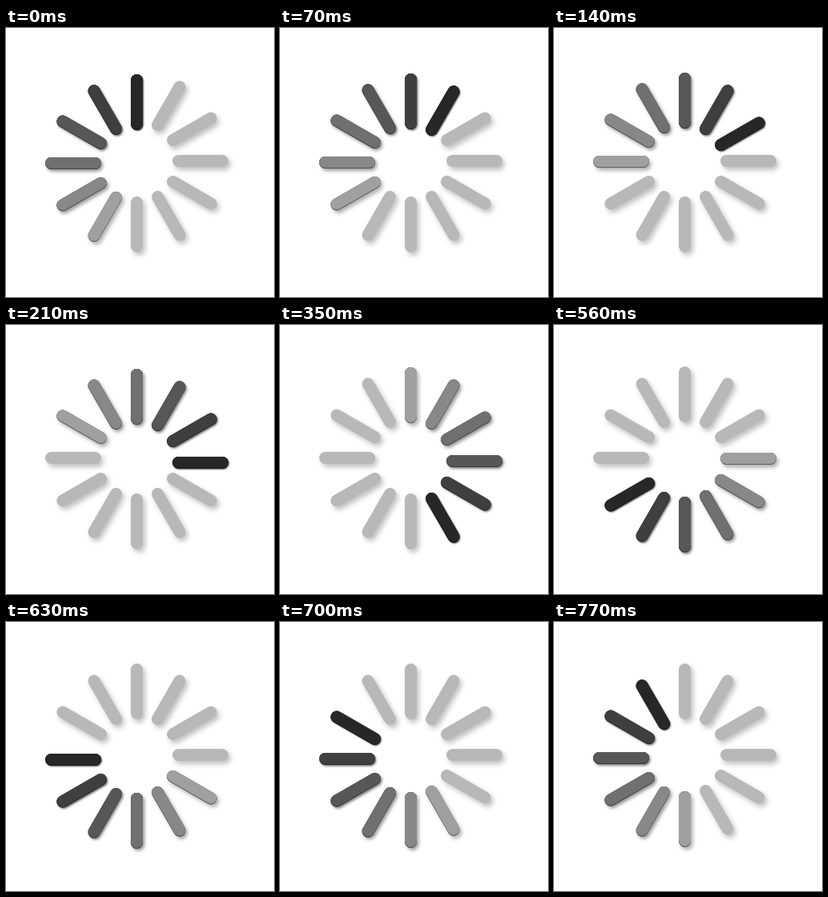
An HTML page with a canvas that plays this animation: 335 px wide and 337 px high, repeating every 840 ms.

```html
<!DOCTYPE html>
<html lang="en">
<head>
<meta charset="utf-8">
<title>Spinner</title>
<style>
  html, body { margin: 0; width: 100%; height: 100%; overflow: hidden; background: #fff; }
  canvas { display: block; }
</style>
</head>
<body>
<canvas id="stage" width="335" height="337"></canvas>
<script>
const ctx = document.getElementById('stage').getContext('2d');
const BARS = 12, STEP_MS = 70, REST = 6;
const CENTER = { x: 163.5, y: 166.5 };
const INNER = 52, OUTER = 107, THICKNESS = 15;

const mix = (a, b, t) => a + (b - a) * t;
const gray = v => `rgb(${v}, ${v}, ${v})`;

function strokeBar(angle, drop, color) {
  const dx = Math.sin(angle), dy = -Math.cos(angle);
  const y = CENTER.y + drop;
  ctx.strokeStyle = color;
  ctx.beginPath();
  ctx.moveTo(CENTER.x + dx * INNER, y + dy * INNER);
  ctx.lineTo(CENTER.x + dx * OUTER, y + dy * OUTER);
  ctx.stroke();
}

// A pressed bar sits lower, darker and closer to its shadow, then rises back.
function drawBar(index, age) {
  const angle = index * 2 * Math.PI / BARS;
  const rise = Math.min(age, REST) / REST;
  const drop = REST * (1 - rise);
  const shade = Math.round(mix(39, 184, rise));
  const edge = rise < 1 ? Math.round(mix(28, 108, rise)) : shade;

  ctx.save();
  ctx.shadowColor = `rgba(0, 0, 0, ${mix(0.65, 0.25, rise)})`;
  ctx.shadowOffsetX = mix(1, 3, rise);
  ctx.shadowOffsetY = mix(1, 4, rise);
  ctx.shadowBlur = mix(2, 6, rise);
  strokeBar(angle, drop, gray(edge));
  ctx.restore();

  if (rise < 1) {
    // Lighter face above a thin dark lower rim.
    ctx.save();
    ctx.globalCompositeOperation = 'source-atop';
    strokeBar(angle, drop, gray(edge));
    ctx.clip(barOutline(angle, drop));
    strokeBar(angle, drop - 1, gray(shade));
    ctx.restore();
  }
}

function barOutline(angle, drop) {
  const path = new Path2D();
  const pill = new Path2D();
  pill.roundRect(-THICKNESS / 2, -OUTER - THICKNESS / 2,
    THICKNESS, OUTER - INNER + THICKNESS, THICKNESS / 2);
  const place = new DOMMatrix()
    .translate(CENTER.x, CENTER.y + drop)
    .rotate(angle * 180 / Math.PI);
  path.addPath(pill, place);
  return path;
}

function render(now) {
  const head = Math.floor(now / STEP_MS) % BARS;
  ctx.fillStyle = '#fff';
  ctx.fillRect(0, 0, 335, 337);
  ctx.lineWidth = THICKNESS;
  ctx.lineCap = 'round';
  for (let i = 0; i < BARS; i++) drawBar(i, (head - i + BARS) % BARS);
}

const start = performance.now();
function tick() {
  render(performance.now() - start);
  requestAnimationFrame(tick);
}
tick();
</script>
</body>
</html>
```
